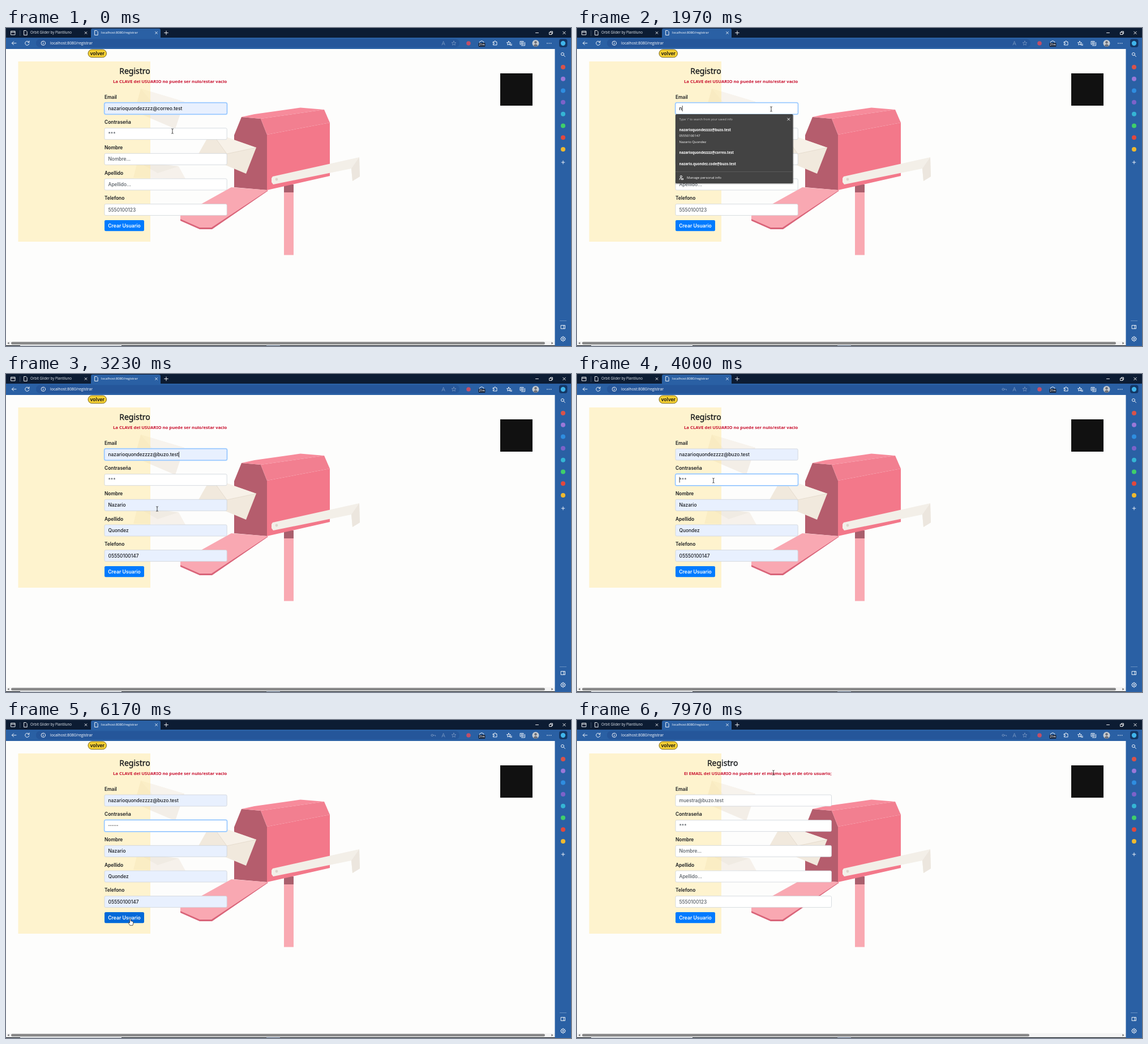
Animation of 998 by 561 pixels, one loop 8000 ms. Source, as an HTML page:

```html
<!DOCTYPE html>
<html lang="es">
<head>
<meta charset="utf-8">
<title>Registro</title>
<style>
  html, body { margin: 0; width: 100%; height: 100%; overflow: hidden; background: #fdfdfc; }
  svg { display: block; width: 100vw; height: 100vh; }
  text { white-space: pre; }
  .form { font-family: Inter, "Open Sans", sans-serif; }
  .head { font-family: "Noto Sans", "Open Sans", sans-serif; }
  .ui { font-family: "Open Sans", "Noto Sans", sans-serif; }
  .dots { font-family: "DejaVu Sans", sans-serif; }
  .line { fill: none; stroke: #fff; stroke-width: .9; stroke-linecap: round; stroke-linejoin: round; }
</style>
</head>
<body>
<svg id="stage" viewBox="0 0 998 561" xmlns="http://www.w3.org/2000/svg"></svg>
<script>
const LOOP = 8000;
const FILL_AT = 2790, PASS_AT = 3800, RELOAD_AT = 6600;
const KEYS = [4400, 4650, 4900, 5150, 5400, 5600];

const FIRST = 'Nazario', LAST = 'Quondez', PHONE = '05550100147';
const USER = (FIRST + LAST).toLowerCase() + 'zzz';
const OLD_MAIL = USER + '@correo.test', NEW_MAIL = USER + '@buzo.test';
const ERRORS = [
  'La CLAVE del USUARIO no puede ser nulo/estar vacio',
  'El EMAIL del USUARIO no puede ser el mismo que el de otro usuario;'
];
const FIELDS = [
  ['Email', 'muestra@buzo.test'],
  ['Contraseña', '***'],
  ['Nombre', 'Nombre...'],
  ['Apellido', 'Apellido...'],
  ['Telefono', '5550100123']
];

// Pointer stops: time, x, y
const PATH = [
  [0, 294, 182], [500, 294, 182], [1000, 343, 143], [2200, 343, 143],
  [2600, 240, 186], [2850, 240, 186], [3230, 267, 238], [3750, 241, 188],
  [5400, 241, 188], [6000, 219.5, 350.5], [6450, 219.5, 350.5],
  [6970, 405.5, 293.5], [7530, 665, 308], [7750, 292, 95], [7970, 347, 93]
];

const rect = (x, y, w, h, fill, more = '') =>
  `<rect x="${x}" y="${y}" width="${w}" height="${h}" fill="${fill}" ${more}/>`;
const poly = (points, fill, more = '') => `<polygon points="${points}" fill="${fill}" ${more}/>`;
const disc = (x, y, r, fill) => `<circle cx="${x}" cy="${y}" r="${r}" fill="${fill}"/>`;
const line = (d, more = '') => `<path class="line" d="${d}" ${more}/>`;
// Text whose vertical middle sits at y
const text = (x, y, str, size, kind, fill, more = '') =>
  `<text class="${kind}" x="${x}" y="${y + size * .35}" font-size="${size}" fill="${fill}" ${more}>${str}</text>`;

const star = (x, y, r) => 'M' + Array.from({ length: 10 }, (_, i) => {
  const a = i * Math.PI / 5 - Math.PI / 2, q = i % 2 ? r * .45 : r;
  return `${(x + q * Math.cos(a)).toFixed(2)} ${(y + q * Math.sin(a)).toFixed(2)}`;
}).join('L') + 'Z';

function mailbox() {
  return `<g>
    <g opacity=".65">
      ${poly('238,107 315,130 299,178 227,147', '#efe7dd')}
      ${poly('238,107 315,130 268,142', '#f5efe6')}
      ${poly('232,236 305,244 317,266 225,264', '#f3ece2')}
      ${poly('232,236 305,244 268,256', '#eae2d7')}
    </g>
    ${rect(491, 276, 17, 124.5, '#f9a9b2')}
    ${rect(491, 276, 17, 14, '#a95f6d')}
    ${poly('403,189 416,157 450,160 461,188 461,286 403,281', '#b55d6d')}
    ${poly('362,183 442,211 424,257 340,222', '#f1e9dd')}
    ${poly('362,183 442,211 390,222', '#f7f1e8')}
    <path d="M362 183L390 222L442 211" fill="none" stroke="#e2d8ca" stroke-width=".8"/>
    ${poly('416,157 439,152 520,140.5 562,144 450,160', '#f78b9b')}
    ${poly('450,160 562,144 572,167 461,188', '#f27f90')}
    ${poly('461,188 572,167 572,261 461,286', '#f3788a')}
    ${poly('308,332 398,283 463,287 364,355 342,355 308,340', '#d96479')}
    ${poly('308,331 398,281 463,286 363,352 342,352 308,337', '#f9a8b2')}
    ${poly('471,262 624,228 625,262 612,270 610,248 472,276 469,272 469,265', '#f3efe8')}
    ${poly('610,248 624,228 625,262 612,270', '#ece6de')}
    ${disc(478, 267, 2.4, '#ddd5cc')}
  </g>`;
}

function chrome() {
  const bar = '#2a60a4';
  const page = x => line(`M${x} 4.5h3.2l2 2v6h-5.2z`);
  const cross = (x, y, r) => line(`M${x - r} ${y - r}l${2 * r} ${2 * r}m0 ${-2 * r}l${-2 * r} ${2 * r}`);
  const plus = (x, y, r) => line(`M${x - r} ${y}h${2 * r}M${x} ${y - r}v${2 * r}`);
  const apps = ['#d9534a', '#9a78d8', '#2f8de0', '#7c62c9', '#35b5d4', '#3fcf6a', '#e2483d', '#efb92f'];
  return rect(0, 0, 998, 18, '#0c1c33') + rect(0, 17, 998, 20, bar) + rect(969.5, 17, 28.5, 544, bar)
    + `<path d="M150 18V4q0-3 3-3h117q3 0 3 3v14z" fill="${bar}"/>`
    + line('M9 5.500h7v6.500h-7zM9 7.500h7') + rect(24.5, 4, .7, 10, '#50607a')
    + page(32) + text(43, 8, 'Orbit Glider by Plantiluno', 6.2, 'ui', '#e6ebf2') + cross(141, 8.5, 1.8)
    + page(157) + text(168, 8, 'localhost:8080/registrar', 5.9, 'ui', '#fff') + cross(265.5, 8.5, 1.8)
    + plus(283, 8.5, 3.3)
    + line('M935.500 8.500h5M960 7.500h4v4h-4zM961.500 7.500v-1.500h4v4h-1.500') + cross(986, 8.5, 2.3)
    + line('M18 26.800h-7.500m3-3l-3 3 3 3') + line('M40.500 25a3.600 3.600 0 1 0 .4 2.700M41 22.800v2.500h-2.500')
    + rect(53, 19.5, 748, 14.5, '#25569a', 'rx="7"')
    + line('M69.500 26.800a3.700 3.700 0 1 1-7.400 0a3.700 3.700 0 1 1 7.400 0M65.800 26.300v2.300M65.800 24.700v.1')
    + text(78, 26.8, 'localhost:8080/registrar', 6.8, 'ui', '#fff')
    + `<g opacity=".35"><g id="key">${line('M751 27a1.800 1.800 0 1 1 3.600 0a1.800 1.800 0 1 1-3.600 0M754.600 27h4v1.500')}</g>`
    + line('M770 30l2.600-6.500 2.600 6.500M771 28h3.300') + line(star(791, 27, 4)) + '</g>'
    + disc(817, 27, 3.8, '#c04f68')
    + line('M836.500 26.500v-2l3.700-2 3.700 2v2') + rect(834.5, 26, 12, 7, '#18243a', 'rx="1.500"')
    + text(840.5, 29.5, '21m', 4.8, 'ui', '#fff', 'text-anchor="middle" font-weight="600"')
    + line('M860.500 24.500h2a1.300 1.300 0 1 1 2.500 0h2v5.500h-6.500v-2a1.200 1.200 0 1 0 0-1.800z')
    + line(star(888, 27, 3.7)) + line('M890.500 28.500h3M891 30.500h2.500')
    + line('M908.500 23.500h5.500v5.500h-5.500zM910.500 31h6v-5.500M911.200 24.800v3M909.700 26.300h3')
    + disc(935.5, 27, 6, '#c6cbd0') + disc(935.5, 25.3, 2.2, '#6c7079')
    + '<path d="M931.500 31.300q4-6 8 0q-4 3.500-8 0z" fill="#6c7079"/>'
    + [956, 959.3, 962.6].map(x => disc(x, 27, .8, '#fff')).join('')
    + rect(977, 19.5, 14.5, 14.5, '#143765', 'rx="4"') + disc(984, 27, 4.2, '#40b4ea')
    + line('M985.500 46a2.500 2.500 0 1 0-5 0a2.500 2.500 0 1 0 5 0M985 48l2.500 2.500')
    + apps.map((c, i) => disc(984, 69 + i * 20.7, 4, c)).join('')
    + plus(984, 237, 2.8) + rect(978, 516, 12, .7, '#7fa2cf')
    + line('M980.500 524.500h7v6h-7zM985 524.500v6')
    + disc(984, 548.5, 1.2, '#fff') + line('M987.500 548.500a3.500 3.500 0 1 1-7 0a3.500 3.500 0 1 1 7 0')
    + line('M984 544v1M984 552v1M979.500 548.500h1M987.500 548.500h1M980.900 545.400l.6.6M986.500 551l.6.6M980.900 551.600l.6-.6M986.500 546l.6-.6');
}

function scrollbar() {
  return rect(0, 552.5, 970, 7, '#f4f4f4')
    + '<rect id="thumb" x="9" y="553.700" height="4.600" rx="2.300" fill="#878787"/>'
    + poly('2.500,556 5.500,554 5.500,558', '#666') + poly('966.500,556 963.500,554 963.500,558', '#666')
    + rect(0, 559.8, 998, 1.2, '#111820') + rect(25, 559.8, 179, 1.2, '#d4d9df')
    + rect(460, 559.8, 24, 1.2, '#6c7c92');
}

function form() {
  const rows = FIELDS.map(([label], i) => {
    const y = 142 + i * 44.65;
    return text(174, y - 20.2, label, 8.4, 'form', '#181b1f', 'font-weight="600"')
      + `<rect id="glow${i}" x="172.700" y="${y - 11.3}" height="22.600" rx="3.500" fill="#b5d8ff"/>`
      + `<rect id="box${i}" x="174" y="${y - 10}" height="20" rx="2.200" stroke-width=".8"/>`
      + (i ? '' : '<rect id="select" x="180" y="136" height="12" fill="#2f7fe0"/>')
      + text(180.5, y, '', 8.4, 'form', '#222', `id="value${i}" font-weight="500"`);
  }).join('');
  return rect(145, 38, 32.5, 13.8, '#f4cf33', 'rx="6.900" stroke="#6b5a12" stroke-width=".9"')
    + text(161.2, 44.7, 'volver', 8.5, 'form', '#111', 'text-anchor="middle" font-weight="600"')
    + text(0, 76.3, 'Registro', 14, 'head', '#15181b', 'id="title" text-anchor="middle" stroke="#15181b" stroke-width=".3"')
    + text(189, 94.2, '', 7.7, 'head', '#c8102e', 'id="error" font-weight="600"')
    + rows
    + text(180.5, 186.7, '', 5.1, 'dots', '#222', 'id="pass"')
    + `<g id="eye"><path d="M372 187q5-6.500 10 0q-5 5-10 0z" fill="none" stroke="#222" stroke-width=".9"/>${disc(377, 187, 1.6, '#222')}</g>`
    + '<rect id="caret" width=".8" height="10" fill="#111"/>'
    + rect(174, 339, 70, 19.3, '#007bff', 'id="button" rx="2.200"')
    + text(209, 348.8, 'Crear Usuario', 8.6, 'form', '#fff', 'text-anchor="middle" font-weight="600"');
}

function dropdown() {
  const item = (y, str, weight = 400, size = 6) =>
    text(180.5, y, str, size, 'ui', '#fff', `font-weight="${weight}"`);
  return `<g id="menu">
    ${rect(173, 152.5, 210, 123.5, '#000', 'rx="2.500" opacity=".15"')}
    ${rect(174, 152, 207.5, 122.2, '#434343', 'rx="2"')}
    ${rect(174, 171, 207.5, 36, '#555', 'id="hover"')}
    ${text(180.5, 161, "Type '/' to search from your saved info", 5.3, 'ui', '#c4c4c4')}
    ${line('M371.700 159l4 4m0-4l-4 4')}
    ${item(180, NEW_MAIL, 700, 6.1)}${item(190, PHONE, 400, 5.9)}${item(200.5, FIRST + ' ' + LAST, 400, 5.9)}
    ${item(220, OLD_MAIL, 700, 6.1)}
    ${item(240, `${FIRST}.${LAST}.code@buzo.test`.toLowerCase(), 700, 6.1)}
    ${rect(174, 253, 207.5, .7, '#656565')}
    ${line('M181 267.500q0-3.500 3-3.500M185.500 262a1.600 1.600 0 1 0-3.200 0a1.600 1.600 0 1 0 3.200 0M184.500 265.500h3v2h-3z')}
    ${text(194, 264, 'Manage personal info', 6, 'ui', '#fff')}
  </g>`;
}

const pointers = `
  <path id="beam" d="M-1.800 -4.200Q0 -4.200 0 -3.200Q0 -4.200 1.800 -4.200M0 -3.200V3.200M-1.800 4.200Q0 4.200 0 3.200Q0 4.200 1.800 4.200" fill="none" stroke="#111" stroke-width=".8"/>
  <path id="arrow" d="M0 0V8.600L2 6.800L3.300 9.800L4.700 9.200L3.400 6.300H6.200Z" fill="#fff" stroke="#111" stroke-width=".7"/>
  <path id="hand" d="M-.9 .6Q0 -.6 .9 .6V4.200Q2 3.600 2.500 4.700Q3.500 4.100 4 5.100Q5.200 4.800 5.300 6V8.500L4.300 11.800H-.6L-3.400 7.400Q-3 6-.9 7.500Z" fill="#fff" stroke="#111" stroke-width=".7"/>`;

const stage = document.getElementById('stage');
stage.innerHTML = rect(0, 0, 998, 561, '#fdfdfc') + mailbox()
  + rect(21.5, 59, 233.5, 318, '#ffe696', 'opacity=".45"')
  + rect(873, 80, 57, 57, '#111')
  + form() + dropdown() + scrollbar() + chrome() + pointers;

const el = {};
stage.querySelectorAll('[id]').forEach(n => el[n.id] = n);
const set = (id, attrs) => { for (const k in attrs) el[id].setAttribute(k, attrs[k]); };
const show = (id, on) => set(id, { visibility: on ? 'visible' : 'hidden' });
const write = (id, str) => { if (el[id].textContent !== str) el[id].textContent = str; };

function pointerAt(t) {
  const n = PATH.findIndex(p => p[0] > t);
  if (n < 0) return PATH[PATH.length - 1].slice(1);
  const [t0, x0, y0] = PATH[n - 1], [t1, x1, y1] = PATH[n];
  const u = (t - t0) / (t1 - t0), e = u * u * (3 - 2 * u);
  return [x0 + (x1 - x0) * e, y0 + (y1 - y0) * e];
}

function valuesAt(t) {
  if (t >= RELOAD_AT) return ['', '', '', '', ''];
  if (t >= FILL_AT) return [NEW_MAIL, '', FIRST, LAST, PHONE];
  return [t < 1640 ? OLD_MAIL : 'n', '', '', '', ''];
}

function render(t) {
  const reloaded = t >= RELOAD_AT;
  const right = reloaded ? 449.5 : 390.2;
  const values = valuesAt(t);
  const typed = reloaded ? 0 : KEYS.filter(k => k <= t).length;
  const focus = reloaded ? -1 : t < PASS_AT ? 0 : 1;
  const menu = t >= 1700 && t < FILL_AT;
  const [x, y] = pointerAt(t);
  const inside = (l, top, r, bottom) => x > l && x < r && y > top && y < bottom;

  set('title', { x: reloaded ? 257.2 : 227.5 });
  write('error', ERRORS[+reloaded]);
  set('thumb', { width: reloaded ? 790 : 943 });
  show('key', t >= PASS_AT);

  let overField = false;
  FIELDS.forEach(([, hint], i) => {
    const value = values[i], cy = 142 + i * 44.65;
    const filled = value.length > 1;
    set('box' + i, {
      width: right - 174,
      fill: filled ? '#e8f0fe' : '#fff',
      stroke: focus === i ? '#72b4ff' : '#ced4da'
    });
    set('glow' + i, { width: right - 171.4 });
    show('glow' + i, focus === i);
    write('value' + i, value || (i === 1 && typed ? '' : hint));
    set('value' + i, { fill: value ? '#15181c' : '#565d64' });
    overField = overField || inside(174, cy - 10, right, cy + 10);
  });

  const selected = t >= 1150 && t < 1640;
  show('select', selected);
  if (selected) {
    set('select', { width: el.value0.getComputedTextLength() + 1 });
    set('value0', { fill: '#fff' });
  }

  write('pass', '•'.repeat(typed));
  show('eye', typed && t < 5900);

  const edits = [-600, 1640, FILL_AT, PASS_AT, ...KEYS].filter(k => k <= t);
  const since = t - edits[edits.length - 1];
  const end = focus === 0 ? el.value0 : el.pass;
  const offset = focus === 1 && !typed ? 0 : end.getComputedTextLength();
  set('caret', { x: 180.7 + offset, y: focus === 1 ? 181.6 : 137 });
  show('caret', focus >= 0 && !selected && since % 1060 < 530);

  show('menu', menu);
  show('hover', menu && inside(174, 171, 381, 207));

  const onButton = inside(174, 339, 244, 358.3);
  set('button', { fill: onButton ? '#0069d9' : '#007bff' });
  const onText = inside(189, 88, right, 100);
  const onMenu = menu && inside(174, 152, 381, 274);
  const kind = onButton ? 'hand' : !onMenu && (overField || onText) ? 'beam' : 'arrow';
  for (const id of ['beam', 'arrow', 'hand']) {
    show(id, id === kind);
    set(id, { transform: `translate(${x.toFixed(2)} ${y.toFixed(2)})` });
  }
}

const start = performance.now();
function tick() {
  render((performance.now() - start) % LOOP);
  requestAnimationFrame(tick);
}
tick();
</script>
</body>
</html>
```
